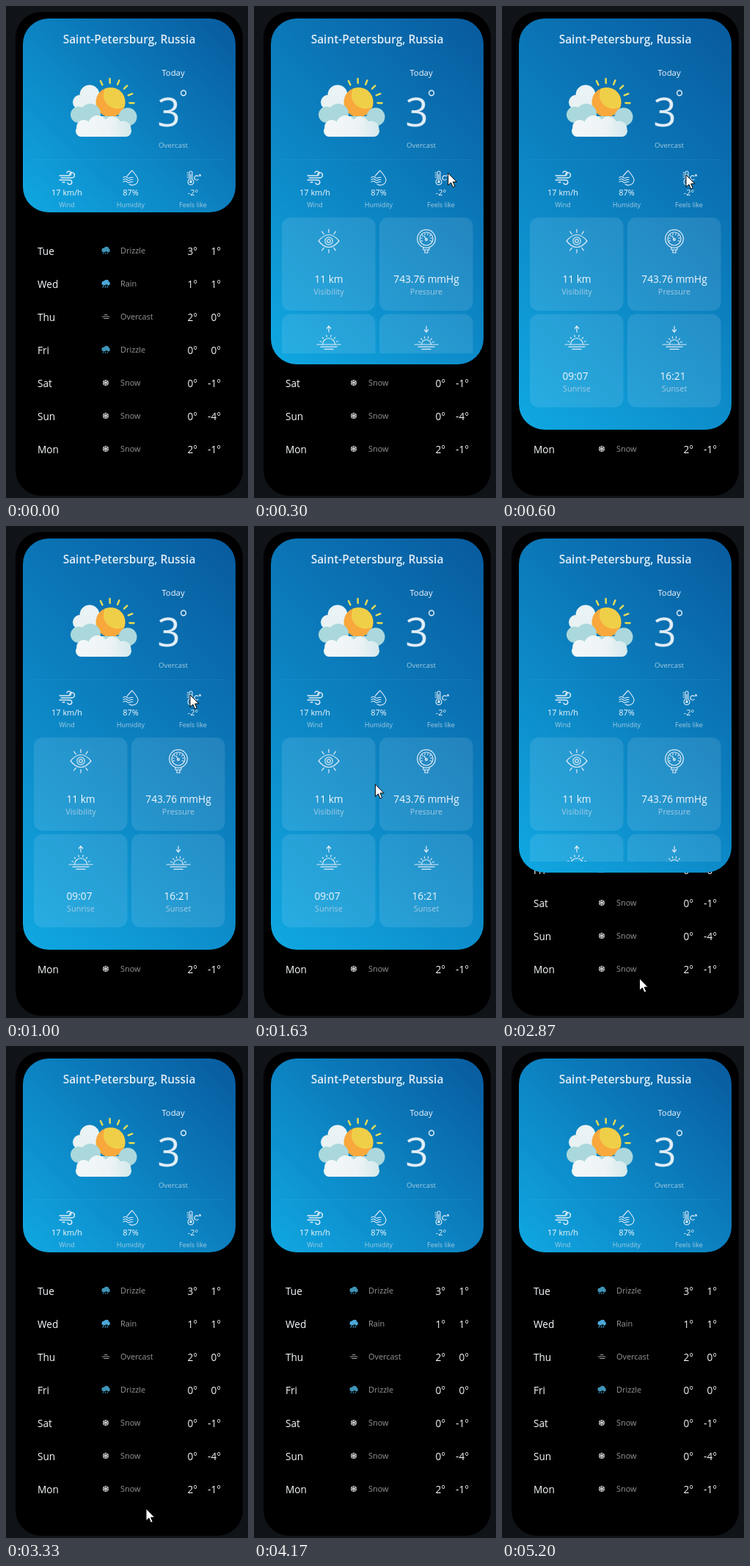
Write an HTML page with a canvas that moves like this. It is 330 px wide and 670 px high and loops after 5.23 s.

```html
<!DOCTYPE html>
<html lang="en">
<head>
<meta charset="utf-8">
<title>Weather card</title>
<style>
  html, body { margin: 0; width: 100%; height: 100%; overflow: hidden; background: #101318; }
  canvas { display: block; width: 330px; height: 670px; }
</style>
</head>
<body>
<canvas id="stage"></canvas>
<script>
const W = 330, H = 670, LOOP = 5230;
const PAGE = '#101318', WHITE = '#f4f8fb', PALE = '#dfecf6', LABEL = '#a3cbe4', GREY = '#959595';
const CARD = { x: 23, y: 17, w: 290, closed: 264, open: 560 };
const OPEN_AT = 95, CLOSE_AT = 2758, EASE_MS = 500;

const canvas = document.getElementById('stage');
const c = canvas.getContext('2d');
const dpr = window.devicePixelRatio || 1;
canvas.width = W * dpr;
canvas.height = H * dpr;

const DAYS = [
  ['Tue', 'Drizzle', 3, 1], ['Wed', 'Rain', 1, 1], ['Thu', 'Overcast', 2, 0],
  ['Fri', 'Drizzle', 0, 0], ['Sat', 'Snow', 0, -1], ['Sun', 'Snow', 0, -4],
  ['Mon', 'Snow', 2, -1]
];

// Pointer moves: start, end, from x/y, to x/y
const MOVES = [
  [-60, 420, 340, 214, 251, 230],
  [1120, 1900, 251, 230, 133, 398],
  [2250, 2980, 133, 398, 191, 630],
  [3680, 4160, 191, 630, 342, 690]
];

const clamp = v => Math.max(0, Math.min(1, v));
const smooth = v => v * v * (3 - 2 * v);

// cubic-bezier(.25, .1, .25, 1)
function ease(x) {
  if (x <= 0 || x >= 1) return clamp(x);
  const bez = (a, b, s) => 3 * a * s * (1 - s) ** 2 + 3 * b * s * s * (1 - s) + s ** 3;
  let lo = 0, hi = 1;
  for (let i = 0; i < 24; i++) {
    const mid = (lo + hi) / 2;
    if (bez(.25, .25, mid) < x) lo = mid; else hi = mid;
  }
  return bez(.1, 1, lo);
}

function text(str, x, y, size, color = WHITE, align = 'center', weight = 400) {
  c.font = `${weight} ${size}px "Open Sans", "Noto Sans", sans-serif`;
  c.textAlign = align;
  c.fillStyle = color;
  c.fillText(str, x, y);
}

function box(x, y, w, h, r) {
  c.beginPath();
  c.roundRect(x, y, w, h, r);
}

function disc(x, y, r, color) {
  c.beginPath();
  c.arc(x, y, r, 0, Math.PI * 2);
  c.fillStyle = color;
  c.fill();
}

function ring(x, y, r, from = 0, to = Math.PI * 2) {
  c.beginPath();
  c.arc(x, y, r, from, to);
  c.stroke();
}

function line(...p) {
  c.beginPath();
  for (let i = 0; i < p.length; i += 2) c.lineTo(p[i], p[i + 1]);
  c.stroke();
}

function curve(d) { c.stroke(new Path2D(d)); }

function rays(x, y, r1, r2, from, to, n) {
  for (let i = 0; i < n; i++) {
    const a = from + (to - from) * i / (n - 1), k = Math.cos(a), s = Math.sin(a);
    line(x + k * r1, y + s * r1, x + k * r2, y + s * r2);
  }
}

function icon(x, y, draw, color = PALE, width = 1.2) {
  c.save();
  c.translate(x, y);
  c.strokeStyle = c.fillStyle = color;
  c.lineWidth = width;
  c.lineCap = c.lineJoin = 'round';
  draw();
  c.restore();
}

function wind() {
  curve('M-10 -3H3a3 3 0 1 0 -3 -4M-8 0H7a3.6 3.6 0 1 0 -3.5 -5M-10 3H4a3 3 0 1 1 -3 4M-6 6H-3');
}

function humidity() {
  curve('M-5 -2C-3 -5 0 -8 2 -10C5 -6 10 -1 10 3A7.5 7.5 0 0 1 -2 8.5');
  for (let y = -.5; y < 7; y += 3) curve(`M-10 ${y}q2.5 -2 5 0t5 0h3`);
}

function thermometer() {
  curve('M-6 2V-7a2 2 0 0 1 4 0V2a4 4 0 1 1 -4 0Z');
  line(-4, -5, -4, 5);
  disc(-4, 5.5, 1.7, PALE);
  for (let y = -7; y < 2; y += 3) line(-9, y, -7.5, y);
  ring(4, 0, 3, .8, 5.5);
  ring(8.5, -3.5, 1);
}

function eye() {
  curve('M-14 0Q0 -17 14 0Q0 17 -14 0Z');
  ring(0, 0, 5.2);
  ring(0, 0, 2.2);
  rays(0, 0, 11.5, 16, -2.2, -.94, 3);
  rays(0, 0, 11.5, 16, .94, 2.2, 3);
}

function gauge() {
  ring(0, -2, 12.3);
  ring(0, -2, 9);
  rays(0, -2, 6, 7.5, 2.7, 6.72, 8);
  line(0, -1, -3, -6);
  ring(0, -1, 1.5);
  curve('M-4 10V13H4V10M-2 13V17H2V13');
}

function horizon(up) {
  const r = up ? 8.5 : 6.5;
  ring(0, 0, r, Math.PI, Math.PI * 2);
  rays(0, 0, r + 2.5, r + 4.5, Math.PI + .35, Math.PI * 2 - .35, 6);
  line(-16, 0, 16, 0);
  line(-11, 3.2, 11, 3.2);
  line(-6, 6.4, 6, 6.4);
  const tip = up ? -25 : -17, d = up ? 3 : -3;
  line(0, -25, 0, -17);
  line(-2.6, tip + d, 0, tip, 2.6, tip + d);
}

function rainCloud(heavy) {
  const blue = heavy ? '#4ba9d8' : '#3f93b8';
  disc(-2.5, -.5, 3, blue);
  disc(1, -2, 3.3, blue);
  disc(3.5, 0, 2.4, blue);
  c.strokeStyle = blue;
  for (let x = -3; x < 4; x += 3) line(x, 3, x - 1, heavy ? 5.5 : 4.6);
}

function overcast() {
  line(-2, -2.5, 2, -2.5);
  line(-5, 0, 5, 0);
  line(-3, 2.5, 4, 2.5);
}

function snow() {
  for (let i = 0; i < 6; i++) {
    line(0, 0, 0, -3.8);
    line(-1.2, -3.6, 0, -2.4, 1.2, -3.6);
    c.rotate(Math.PI / 3);
  }
}

const SMALL = {
  Drizzle: () => rainCloud(false), Rain: () => rainCloud(true),
  Overcast: overcast, Snow: snow
};

function cloud(puffs, color) {
  for (const [x, y, r] of puffs) disc(x, y, r, color);
}

function sunAndClouds() {
  const mist = '#abd8dc';
  cloud([[114, 121, 13.5], [101, 131, 10], [118, 134, 12]], '#e9f2f4');
  icon(142.5, 131, () => rays(0, 0, 26, 32, -Math.PI * .64, .04, 6), '#e9dd55', 2.4);
  disc(142.5, 131, 20, '#f8a83c');
  c.save();
  c.beginPath();
  c.arc(142.5, 131, 20, 0, Math.PI * 2);
  c.clip();
  disc(152, 121, 19, '#f0cf48');
  c.restore();
  cloud([[99, 148, 11], [115, 147, 14], [166, 151, 12.5]], mist);
  c.fillStyle = mist;
  c.fillRect(99, 150, 66, 13);
  const g = c.createLinearGradient(95, 0, 171, 0);
  g.addColorStop(0, '#f3f7f8');
  g.addColorStop(.6, '#eef4f6');
  g.addColorStop(1, '#d3e9ec');
  cloud([[106, 165, 10], [125, 162, 13], [145, 162, 11.5], [160, 167, 10.5]], g);
  c.fillStyle = g;
  box(95, 163, 76, 15, 7.5);
  c.fill();
}

function forecast() {
  DAYS.forEach(([day, sky, hi, lo], i) => {
    const y = 334 + i * 45;
    text(day, 43, y + 5, 13.6, WHITE, 'left');
    icon(136, y - 1, SMALL[sky], sky === 'Overcast' ? '#a0a0a0' : '#dcdcdc', 1);
    text(sky, 156, y + 3, 10.9, GREY, 'left');
    text(hi + '°', 261, y + 5, 13.6, WHITE, 'right');
    text(lo + '°', 293, y + 5, 13.6, WHITE, 'right');
  });
}

function tile(x, y, value, label, draw, dx = 0) {
  c.fillStyle = 'rgba(255,255,255,.1)';
  box(x, y, 127.5, 127, 12);
  c.fill();
  const mid = x + 64;
  draw(mid);
  text(value, mid + dx, y + 89, 13.7);
  text(label, mid, y + 105, 10.9, LABEL);
}

function tiles(bottom) {
  c.save();
  c.beginPath();
  c.rect(CARD.x, 280, CARD.w, Math.max(0, bottom - 15 - 280));
  c.clip();
  tile(38, 288, '11 km', 'Visibility', x => icon(x, 320, eye));
  tile(171, 288, '743.76 mmHg', 'Pressure', x => icon(x, 319, gauge));
  tile(38, 419.5, '09:07', 'Sunrise', x => icon(x, 461, () => horizon(true)), -2);
  tile(171, 419.5, '16:21', 'Sunset', x => icon(x, 461, () => horizon(false)), -2);
  c.restore();
}

// 45deg gradient, corner to corner
function cardFill(h) {
  const { x, y, w } = CARD, s = (w + h) / 4;
  const mx = x + w / 2, my = y + h / 2;
  const g = c.createLinearGradient(mx - s, my + s, mx + s, my - s);
  g.addColorStop(0, '#10a8e2');
  g.addColorStop(1, '#085a9e');
  return g;
}

function card(h) {
  c.save();
  box(CARD.x, CARD.y, CARD.w, h, 35);
  c.fillStyle = cardFill(h);
  c.fill();
  c.clip();

  text('Saint-Petersburg, Russia', 168, 51, 15.45, PALE, 'center', 600);
  sunAndClouds();
  text('Today', 228, 95, 11.3);
  text('3', 222, 163.5, 55, PALE);
  icon(242, 118.5, () => ring(0, 0, 3.4), PALE, 1.5);
  text('Overcast', 228, 193, 9.8, LABEL);

  c.fillStyle = 'rgba(255,255,255,.06)';
  c.fillRect(38, 209, 260, 1);

  icon(83, 234, wind, PALE, 1.4);
  icon(170, 234, humidity, PALE, 1.1);
  icon(256, 234, thermometer, PALE, 1.1);
  [[83, '17 km/h', 'Wind'], [170, '87%', 'Humidity'], [255, '-2°', 'Feels like']]
    .forEach(([x, value, label]) => {
      text(value, x, 258, 10.9);
      text(label, x, 274, 9, LABEL);
    });
  tiles(CARD.y + h);
  c.restore();
}

const ARROW = new Path2D('M0 0V16.5L3.9 12.9L6.6 19.2L9.3 18L6.6 12H11.8Z');

function pointer(t) {
  let [x, y] = MOVES[0].slice(2);
  for (const [t0, t1, x0, y0, x1, y1] of MOVES) {
    if (t < t0) break;
    const k = smooth(clamp((t - t0) / (t1 - t0)));
    x = x0 + (x1 - x0) * k;
    y = y0 + (y1 - y0) * k;
  }
  c.save();
  c.translate(x, y);
  c.fillStyle = '#fff';
  c.strokeStyle = '#000';
  c.lineWidth = 1;
  c.fill(ARROW);
  c.stroke(ARROW);
  c.restore();
}

function draw(t) {
  c.setTransform(dpr, 0, 0, dpr, 0, 0);
  c.fillStyle = PAGE;
  c.fillRect(0, 0, W, H);
  c.fillStyle = '#000';
  box(13, 8, 310, 659, 35);
  c.fill();

  const open = ease((t - OPEN_AT) / EASE_MS) - ease((t - CLOSE_AT) / EASE_MS);
  forecast();
  card(CARD.closed + (CARD.open - CARD.closed) * open);
  if (t >= 15) pointer(t);
}

const start = performance.now();
function tick() {
  draw((performance.now() - start) % LOOP);
  requestAnimationFrame(tick);
}
tick();
</script>
</body>
</html>
```
